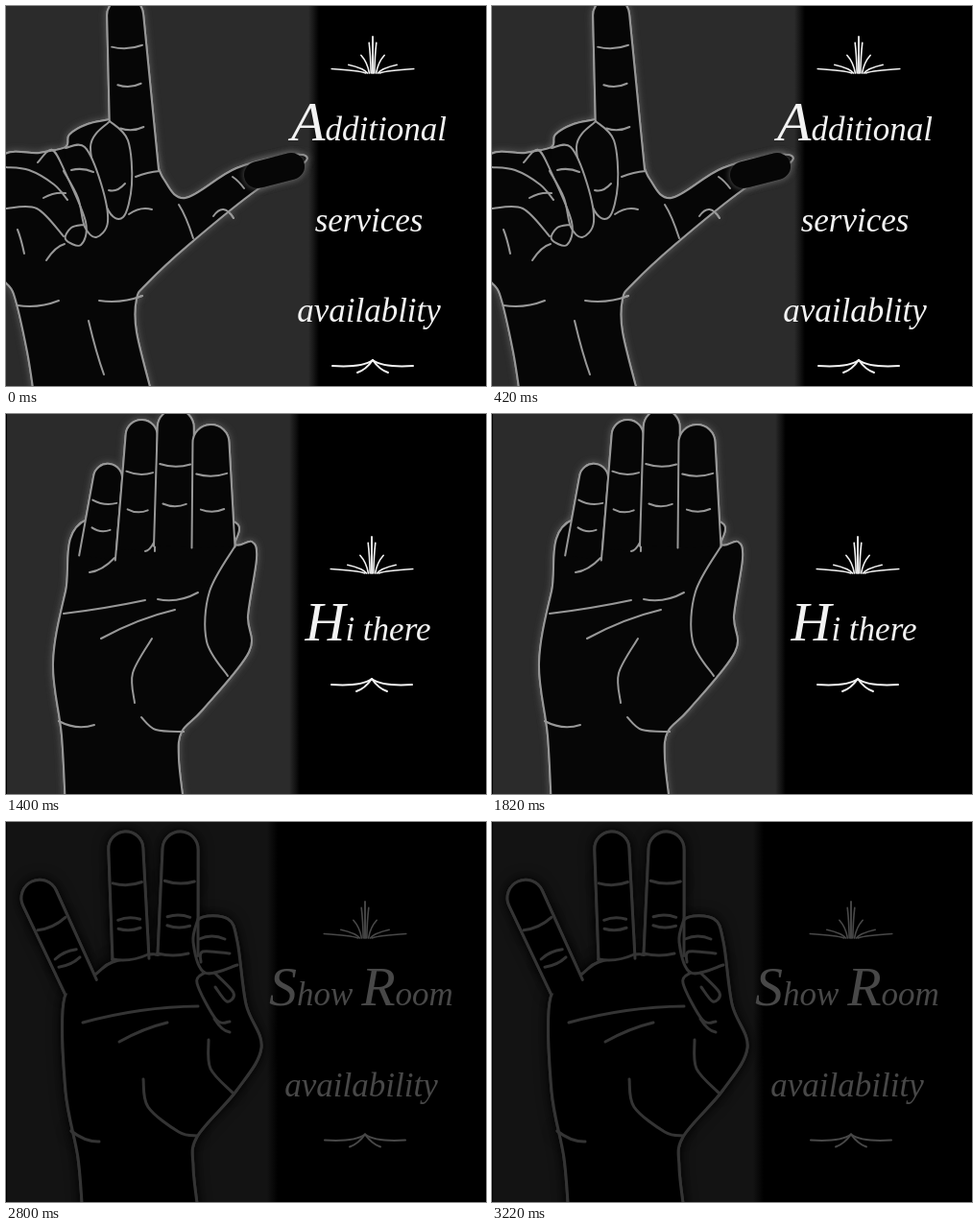
An HTML page with a canvas for the animation above (3500 ms loop, 500 px wide and 396 px high).

```html
<!DOCTYPE html>
<html lang="en">
<head>
<meta charset="utf-8">
<title>Hand signs</title>
<style>
  html, body { margin: 0; width: 100%; height: 100%; overflow: hidden; background: #000; }
  canvas { display: block; }
</style>
</head>
<body>
<canvas id="stage" width="500" height="396"></canvas>
<script>
const ctx = document.getElementById('stage').getContext('2d');
const HOLD = 700;
const LINE_GAP = 94.5;
const BRIGHT = { panel: '#2b2b2b', skin: '#060606', line: '#989898', glow: '#5c5c5c', blur: 7, text: '#f2f2f2', width: 2 };
const DIM = { panel: '#131313', skin: '#000', line: '#343434', glow: '#000', blur: 14, text: '#484848', width: 3 };

// Smooth Catmull-Rom spline through x, y pairs.
function spline(coords) {
  const pts = [];
  for (let i = 0; i < coords.length; i += 2) pts.push([coords[i], coords[i + 1]]);
  ctx.beginPath();
  ctx.moveTo(...pts[0]);
  for (let i = 1; i < pts.length; i++) {
    const a = pts[i - 1], b = pts[i];
    const before = pts[i - 2] || a, after = pts[i + 1] || b;
    ctx.bezierCurveTo(
      a[0] + (b[0] - before[0]) / 6, a[1] + (b[1] - before[1]) / 6,
      b[0] - (after[0] - a[0]) / 6, b[1] - (after[1] - a[1]) / 6, b[0], b[1]);
  }
}

function line(...coords) {
  spline(coords);
  ctx.stroke();
}

function shape(...coords) {
  spline(coords);
  ctx.fill();
  ctx.stroke();
}

// Short line that sags by bend in its middle.
function crease(x0, y0, x1, y1, bend = 3) {
  ctx.beginPath();
  ctx.moveTo(x0, y0);
  ctx.quadraticCurveTo((x0 + x1) / 2, (y0 + y1) / 2 + 2 * bend, x1, y1);
  ctx.stroke();
}

// Tapered finger, open at its base; joints are fractions of its length.
function finger(x0, y0, x1, y1, baseWidth, tipWidth, joints = [0.6, 0.31], paired = false) {
  const length = Math.hypot(x1 - x0, y1 - y0), r = tipWidth / 2;
  ctx.save();
  ctx.translate(x0, y0);
  ctx.rotate(Math.atan2(y1 - y0, x1 - x0));
  ctx.beginPath();
  ctx.moveTo(0, -baseWidth / 2);
  ctx.arc(length - r, 0, r, -Math.PI / 2, Math.PI / 2);
  ctx.lineTo(0, baseWidth / 2);
  ctx.fill();
  ctx.stroke();
  const bow = (x, half, sag) => {
    ctx.beginPath();
    ctx.moveTo(x, -half);
    ctx.quadraticCurveTo(x - sag, 0, x, half);
    ctx.stroke();
  };
  joints.forEach((t, i) => {
    const half = tipWidth * (i ? 0.32 : 0.42);
    bow(t * length, half, paired && i ? -4 : 5);
    if (paired && i) bow(t * length - 9, half, 4);
  });
  ctx.restore();
}

// Blurred tip without an outline.
function softTip(x0, y0, x1, y1, width) {
  ctx.save();
  ctx.strokeStyle = ctx.fillStyle;
  ctx.lineWidth = width;
  ctx.shadowColor = BRIGHT.glow;
  ctx.shadowBlur = BRIGHT.blur;
  line(x0, y0, x1, y1);
  ctx.restore();
}

function pointingHand() {
  shape(30,412, 22,360, 8,300, -8,270, -8,163, 35,153, 62,147, 66,134, 85,123, 108,118, 130,112, 152,150,
    164,180, 187,200, 240,169, 300,155, 311,163, 262,191, 190,249, 147,289, 136,305, 136,340, 154,412);
  finger(134, 172, 123, -9, 50, 38, [0.72, 0.5, 0.25]);
  shape(108,120, 88,147, 105,210, 122,220, 131,186, 127,140, 108,120);
  shape(62,148, 82,147, 99,185, 106,225, 94,241, 82,230, 75,200, 60,172);
  line(33,163, 48,150, 62,174, 83,225, 78,249, 62,243, 68,231, 81,228);
  line(0,168, 24,171, 50,186, 64,202);
  line(0,211, 32,211, 60,240);
  crease(39, 200, 62, 195, -2);
  crease(68, 171, 91, 173, -2);
  crease(107, 192, 124, 185);
  crease(135, 178, 160, 172, -1);
  crease(128, 217, 152, 212, -3);
  crease(42, 265, 61, 248, -3);
  crease(12, 233, 19, 258, -2);
  crease(180, 207, 195, 242, -3);
  crease(216, 219, 237, 221, -8);
  crease(12, 312, 55, 307);
  crease(97, 307, 142, 302);
  crease(86, 328, 102, 384);
  softTip(262, 176, 297, 167, 28);
  crease(236, 178, 248, 190, -1);
}

function fistHand() {
  shape(48,380, 58,300, 54,245, 32,180, 32,130, 50,88, 84,74, 98,48, 125,44, 150,21, 184,29,
    213,13, 247,38, 250,92, 261,125, 248,180, 218,236, 207,300, 205,380);
  line(48,380, 205,380);
  line(82,74, 103,104, 109,149, 88,151, 65,105, 44,108);
  line(184,29, 186,50, 215,54, 228,73, 210,93, 180,96, 135,86, 123,66, 130,52, 186,50);
  line(131,54, 160,53, 161,64, 135,63, 131,54);
  line(112,127, 128,146, 150,136, 165,109, 190,112);
  line(182,97, 180,110, 158,140, 155,163);
  line(146,94, 154,109, 169,112);
  line(188,99, 192,125, 214,148);
  line(160,121, 135,152, 131,178, 155,214, 193,234, 218,236);
  crease(113, 127, 146, 123);
  crease(117, 135, 142, 130, 2);
  crease(76, 137, 103, 130, 2);
  crease(36, 135, 61, 136, -3);
  crease(187, 96, 205, 93, -3);
  crease(122, 203, 144, 226);
  crease(54, 245, 116, 248, 5);
}

function openHand() {
  shape(62,412, 58,335, 49,260, 62,185, 84,110, 230,110, 239,136, 256,133, 261,150, 252,210,
    253,248, 205,308, 183,331, 180,360, 186,412);
  finger(95, 150, 108, 52, 38, 30);
  finger(135, 142, 142, 6, 40, 33);
  finger(175, 138, 177, -5, 42, 38);
  finger(216, 139, 213, 11, 45, 38);
  line(239,137, 212,185, 209,237, 231,273);
  crease(87, 165, 113, 150);
  crease(145, 143, 154, 134, 2);
  crease(60, 208, 145, 194, 1);
  crease(99, 234, 176, 204, -3);
  crease(158, 193, 200, 186, 4);
  line(152,234, 132,270, 134,301);
  line(141,316, 156,329, 185,331);
  crease(55, 320, 92, 324, 4);
}

function victoryHand() {
  shape(76,412, 82,360, 78,312, 55,245, 49,205, 75,178, 72,148, 88,127, 112,112, 118,95, 151,112, 167,95,
    203,100, 212,150, 223,235, 212,330, 203,370, 202,412);
  finger(124, 114, 78, -21, 40, 36, undefined, true);
  finger(188, 112, 205, -18, 48, 40, undefined, true);
  line(74,166, 96,175, 134,212, 132,255, 96,230, 84,207, 58,208);
  shape(104,122, 140,150, 200,195, 219,235, 204,244, 150,211, 100,172, 90,142, 104,122);
  line(134,240, 132,272, 138,295);
  line(148,288, 175,311, 215,300);
  line(115,242, 126,233, 126,247, 115,242);
  crease(121, 128, 138, 119, -1);
  crease(173, 119, 203, 125, -1);
  crease(162, 172, 190, 154);
  crease(175, 172, 190, 163, 1);
  crease(54, 220, 78, 222, -3);
  crease(110, 195, 122, 190, -1);
  crease(140, 213, 178, 229);
  crease(109, 266, 118, 249, -2);
  crease(80, 315, 126, 322, 6);
  crease(157, 313, 157, 341, 0);
  crease(171, 309, 170, 346, 0);
}

function okayHand() {
  shape(80,412, 75,350, 62,280, 61,183, 93,159, 111,146, 150,138, 160,138, 194,130, 201,101,
    231,101, 241,125, 250,190, 266,235, 240,280, 199,328, 195,360, 201,412);
  finger(78, 172, 27, 62, 36, 38, undefined, true);
  finger(130, 143, 124, 10, 38, 36, undefined, true);
  finger(179, 139, 182, 10, 42, 37, undefined, true);
  line(200,101, 195,125, 207,157, 241,149);
  line(207,157, 199,168, 219,206, 233,208);
  line(217,157, 237,178, 230,187, 218,172);
  line(203,146, 205,135, 233,137);
  line(211,227, 213,257, 236,282);
  line(143,268, 148,297, 180,323, 199,327);
  crease(201, 122, 228, 122, -3);
  crease(217, 205, 233, 219);
  crease(111, 143, 148, 138);
  crease(158, 137, 190, 137, 2);
  crease(80, 209, 200, 192, -4);
  crease(118, 229, 168, 209, -2);
  crease(68, 322, 97, 333);
}

const scenes = [
  { draw: pointingHand, look: BRIGHT, panel: [0, 322], cx: 382, baseline: 140, text: ['Additional', 'services', 'availablity'] },
  { draw: fistHand, look: BRIGHT, panel: [0, 290], cx: 372, baseline: 187, text: ['Book a table', 'for restaurant'] },
  { draw: openHand, look: BRIGHT, panel: [1, 302], cx: 381, baseline: 236, text: ['Hi there'] },
  { draw: victoryHand, look: BRIGHT, panel: [2, 278], cx: 376, baseline: 241, text: ['Rooms tarrif'] },
  { draw: okayHand, look: DIM, panel: [1, 279], cx: 374, baseline: 191, text: ['Show Room', 'availability'] }
];

function drawPanel({ look, panel: [left, right] }) {
  ctx.fillStyle = '#000';
  ctx.fillRect(0, 0, 500, 396);
  const fade = ctx.createLinearGradient(right - 7, 0, right + 4, 0);
  fade.addColorStop(0, look.panel);
  fade.addColorStop(1, '#000');
  ctx.fillStyle = fade;
  ctx.fillRect(left, 0, right + 4 - left, 396);
}

// The first pass lays the glow, the second covers what falls inside the hand.
function drawHand({ look, draw }) {
  ctx.save();
  ctx.lineCap = ctx.lineJoin = 'round';
  ctx.fillStyle = look.skin;
  ctx.strokeStyle = look.line;
  ctx.lineWidth = look.width;
  ctx.shadowColor = look.glow;
  for (const blur of [look.blur, 0]) {
    ctx.shadowBlur = blur;
    draw();
  }
  ctx.restore();
}

function stem(x0, y0, cx, cy, x1, y1) {
  ctx.beginPath();
  ctx.moveTo(x0, y0);
  ctx.quadraticCurveTo(cx, cy, x1, y1);
  ctx.stroke();
}

function drawOrnaments(cx, top, bottom) {
  ctx.lineCap = 'round';
  for (const side of [-1, 1]) {
    ctx.save();
    ctx.translate(cx, 0);
    ctx.scale(side, 1);
    ctx.lineWidth = 1.6;
    for (let i = 0; i < 5; i++) {
      const tipX = 1.5 * i + 2.3 * i * i;
      const tipY = -3 - 35 * Math.exp(-i * i / 5);
      stem(tipX, top + tipY, 1.5 * i + tipX * 0.2, top + tipY * 0.6, 1.8 * i, top);
    }
    ctx.lineWidth = 2;
    stem(0, bottom, 11, bottom + 8, 42, bottom + 6);
    stem(0, bottom, 7, bottom + 10, 16, bottom + 13);
    ctx.restore();
  }
}

// Capitals are set larger than the rest of the line.
function drawLine(text, cx, y) {
  const setFont = ch => {
    const size = /[A-Z]/.test(ch) ? 58 : 35;
    ctx.font = `italic ${size}px "Liberation Serif", serif`;
  };
  const parts = text.match(/[A-Z]|[^A-Z]+/g);
  const widths = parts.map(part => (setFont(part), ctx.measureText(part).width));
  let x = cx - widths.reduce((sum, w) => sum + w) / 2;
  parts.forEach((part, i) => {
    setFont(part);
    ctx.fillText(part, x, y);
    x += widths[i];
  });
}

function drawCaption({ look, cx, baseline, text }) {
  ctx.fillStyle = ctx.strokeStyle = look.text;
  const last = baseline + (text.length - 1) * LINE_GAP;
  text.forEach((words, i) => drawLine(words, cx - 4, baseline + i * LINE_GAP));
  drawOrnaments(cx, baseline - 70, last + 40);
}

function render(time) {
  const scene = scenes[Math.floor(time / HOLD) % scenes.length];
  drawPanel(scene);
  drawHand(scene);
  drawCaption(scene);
}

let start;
function tick(now) {
  start ??= now;
  render(now - start);
  requestAnimationFrame(tick);
}
render(0);
requestAnimationFrame(tick);
</script>
</body>
</html>
```
